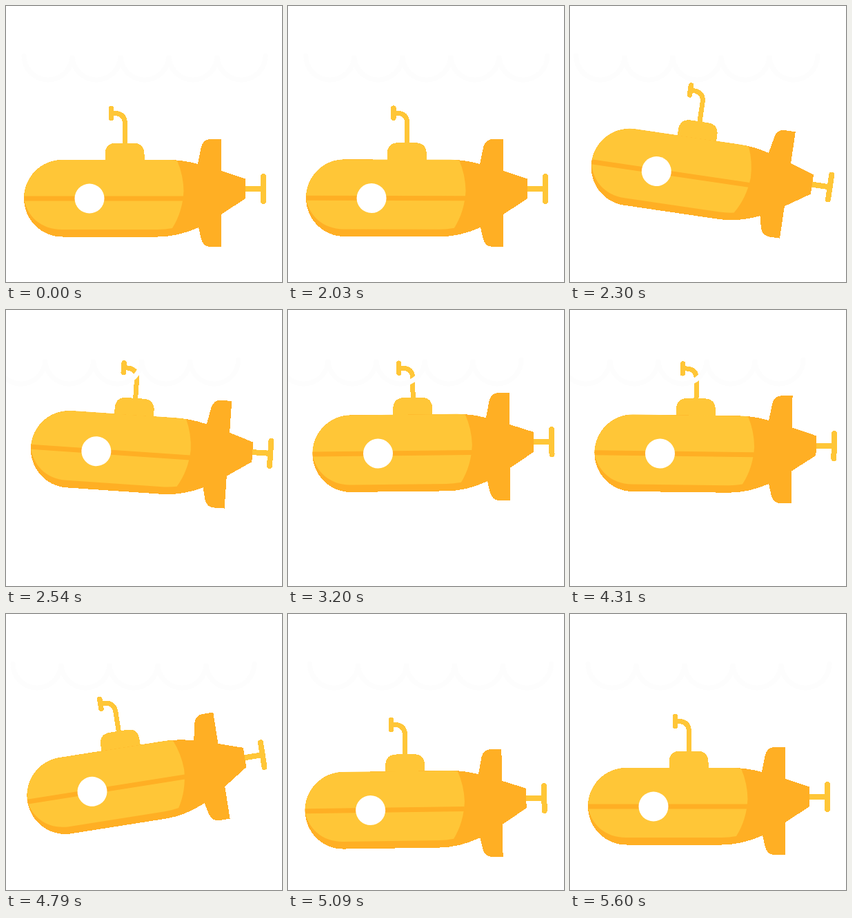
Recreate the animation shown at these times as an HTML page. Size 400x400 px, loop 5840 ms.

```html
<!DOCTYPE html>
<html lang="en">
<head>
<meta charset="utf-8">
<title>Submarine</title>
<style>
  html, body { margin: 0; width: 100%; height: 100%; overflow: hidden; background: #fff; }
  svg { display: block; width: 100vw; height: 100vh; }
  .light { fill: #ffc637; }
  .dark { fill: #ffaf24; }
  .tube { fill: none; stroke: #ffc637; stroke-linecap: round; }
  .crisp { shape-rendering: crispEdges; }
</style>
</head>
<body>
<svg viewBox="0 0 400 400">
  <g id="sub">
    <g class="crisp">
      <path class="tube" stroke-width="7.5" d="M152.5 148.5V162.5"/>
      <path class="tube" stroke-width="7" d="M153 155.5H158Q172.5 156 172.5 171V202"/>
      <path class="light" d="M143.5 226V215Q143.5 198.5 160 198.5H184Q200.5 198.5 200.5 215V226Z"/>
      <path class="tube" stroke-width="8" d="M345 265H372M373 247V283"/>
      <path class="dark" d="M81.5 223H235Q256 223 278 229L283 204Q286 193 297 193H312V239L347 250.5V279L312 302V349H297Q286 349 283 338L279 321Q249 334.5 220 334.5H81.5A55.5 55.75 0 0 1 81.5 223Z"/>
    </g>
    <path class="light" d="M26 279A55.5 56 0 0 1 81.5 223H235Q242 223 248 224Q257 245 257.5 268Q256 298 241 322Q230 324 220 324H81C50 324 30 304 26 279Z"/>
    <path class="dark" d="M26 275.5H257.3L256.4 282.5H26.2Z"/>
    <circle cx="121" cy="279" r="21.5" fill="#fff"/>
  </g>
  <path id="waves" fill="none" stroke="#fdfdfd" stroke-width="7" stroke-linecap="round"/>
</svg>
<script>
const LOOP = 5840, STEP = 30;
const RISE = 2000, DIVE = 4440;

const sub = document.getElementById("sub");
const waves = document.getElementById("waves");
waves.setAttribute("d", "M26 72" + "a35 35 0 0 0 70 0".repeat(5));

// Position within a time span, from 0 to 1
const span = (t, from, length) => Math.min(1, Math.max(0, (t - from) / length));
const ease = p => (1 - Math.cos(Math.PI * p)) / 2;
const pulse = p => Math.sin(Math.PI * p) ** 2;

// One trip between the depths: ease across, tilt into it, overshoot and tilt back
function trip(t) {
  const over = pulse(span(t, 300, 860));
  return {
    x: 9.5 * ease(span(t, 0, 640)) + 1.5 * over,
    y: -71 * ease(span(t, 0, 560)) - 6 * over,
    tilt: 9 * pulse(span(t, 0, 720)) - 2 * pulse(span(t, 720, 440))
  };
}

function pose(t) {
  const up = trip(t - RISE), down = trip(t - DIVE);
  const wobble = -Math.sin(2 * Math.PI * span(t, 2310, 2290));
  return {
    x: up.x - down.x,
    y: up.y - down.y,
    tilt: up.tilt - down.tilt + wobble
  };
}

const start = performance.now();

function draw() {
  const now = (performance.now() - start) % LOOP;
  const t = RISE + Math.floor((now - RISE) / STEP) * STEP;
  const { x, y, tilt } = pose(t);
  sub.setAttribute("transform", `translate(${x} ${y}) rotate(${tilt} 121 279)`);
  waves.setAttribute("transform", `translate(${-4 * x} 0)`);
  requestAnimationFrame(draw);
}
draw();
</script>
</body>
</html>
```
